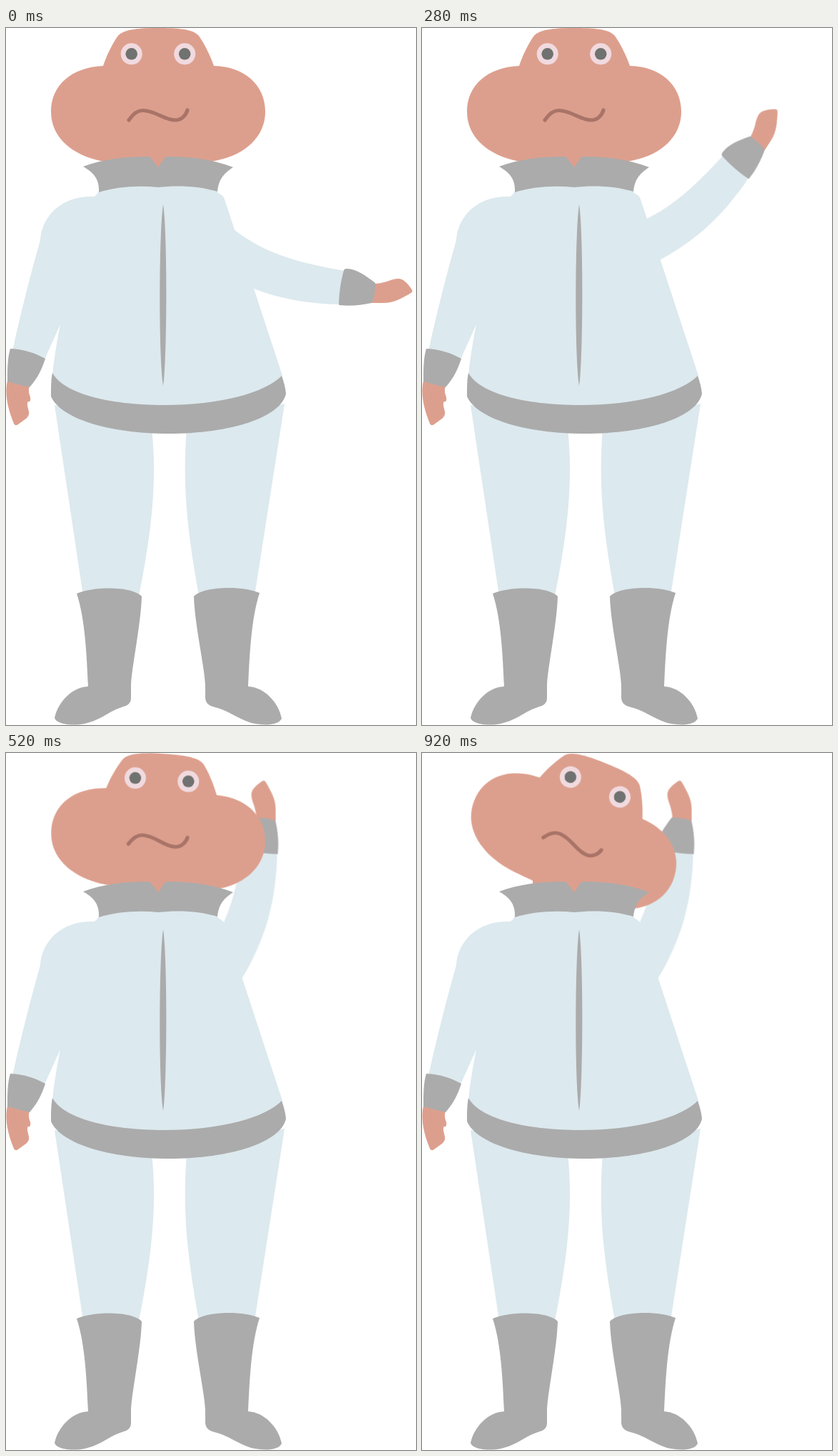
An HTML page for the animation above (0.96 s loop, 574 px wide and 976 px high).

```html
<!DOCTYPE html>
<html lang="en">
<head>
<meta charset="utf-8">
<title>Waving figure</title>
<style>
  html, body { margin: 0; width: 100%; height: 100%; overflow: hidden; background: #fff; }
  svg { display: block; width: 100%; height: 100%; }
  .skin { fill: #dd9f8d; }
  .suit { fill: #dce9ee; }
  .trim { fill: #ababab; }
  .ring { fill: #f0dadf; }
  .pupil { fill: #6f7270; }
  .mouth { fill: none; stroke: #a97468; stroke-width: 5.2; stroke-linecap: round; }

  /* 40 ms steps: the arm rises for 440 ms, then the head tilts */
  .arm { transform-origin: 300px 307.5px; animation: raise 960ms infinite; }
  .head { transform-origin: 198.5px 118px; animation: tilt 960ms infinite; }
  @keyframes raise {
    0% { transform: rotate(0deg); animation-timing-function: steps(11, end); }
    45.8333%, 100% { transform: rotate(-90deg); }
  }
  @keyframes tilt {
    0% { transform: rotate(0deg); animation-timing-function: step-end; }
    45.8333% { transform: rotate(0deg); animation-timing-function: steps(13, end); }
    100% { transform: rotate(23.75deg); }
  }
</style>
</head>
<body>
<svg viewBox="0 0 574 976" preserveAspectRatio="none">
  <!-- legs and boots -->
  <path class="suit" d="M68 528 L108 795 L186 795 C206 695 211 630 204 560 Z"/>
  <path class="suit" d="M390 526 L348 795 L270 795 C253 700 247 640 253 560 Z"/>
  <path class="trim" d="M99 792 C124 781 178 782 190 796 C189 835 175 900 175 922 V938 C175 944 172 948 165 950 C142 957 132 971 105 975 C88 977 70 974 68 966 C73 944 92 923 115 922 C113 880 111 828 99 792 Z"/>
  <path class="trim" d="M263 796 C275 782 330 780 355 791 C343 828 341 880 339 922 C362 923 382 945 386 967 C381 977 360 977 343 973 C322 966 312 956 292 951 C283 949 279 944 279 937 V921 C279 900 264 835 263 796 Z"/>

  <!-- raised arm -->
  <g class="arm">
    <path class="skin" d="M514 358 C532 358 536 352 549 351 C556 351 562 357 568 366 Q570 369 567 371 C553 379 543 385 528 385 L511 385 Z"/>
    <path class="suit" d="M320 283 C362 315 405 328 474 340 L468 387 C400 386 345 370 292 338 L280 330 L288 290 Z"/>
    <path class="trim" d="M473 339 Q474 337 477 337 C490 337 504 347 517 357 C517 368 516 377 512 385 C497 388 482 390 466 388 C466 371 469 354 473 339 Z"/>
  </g>

  <!-- torso and hanging arm -->
  <path class="skin" d="M2 494 C-2 512 2 532 11 554 Q13 558 17 555 L28 547 Q33 543 32 537 C30 530 29 525 31 523 Q35 524 34 517 C32 511 31 508 33 501 Z"/>
  <path class="suit" d="M131 226 Q128 234 123 236 C80 234 50 262 48 297 C33 350 21 398 9 452 L54 464 L76 415 C71 440 67 465 65 486 L120 540 H330 L387 487 L305 237 Q301 233 297 231 L290 215 H140 Z"/>
  <path class="trim" d="M6 449 C26 450 40 455 55 463 C50 479 43 492 33 503 C21 500 11 498 2 495 C2 478 2 462 6 449 Z"/>
  <path class="trim" d="M65 483 C80 511 142 528 222 528 C300 528 362 511 386 487 C389 495 391 504 392 512 C385 545 315 568 228 568 C142 568 76 546 63 516 C63 504 63 492 65 483 Z"/>
  <path class="trim" d="M220 247 C226 285 225.5 465 220 501 C213.5 465 214 285 220 247 Z"/>

  <path class="skin" d="M155 176 H262 V190 L213 204 L155 190 Z"/>
  <g class="head">
    <path class="skin" d="M136 53 C141 38 148 24 156 12 C164 1 190 0 213 0 C238 0 262 1 270 11 C279 24 286 39 291 53 C334 54 363 80 363 117 C363 152 335 177 297 185 C276 190 236 191 213 191 C190 191 150 190 132 186 C95 178 63 155 63 117 C63 80 92 55 136 53 Z"/>
    <circle class="ring" cx="175.7" cy="36.3" r="15"/>
    <circle class="ring" cx="250.2" cy="36.3" r="15"/>
    <circle class="pupil" cx="175.7" cy="36.3" r="8.3"/>
    <circle class="pupil" cx="250.2" cy="36.3" r="8.3"/>
    <path class="mouth" d="M172 129 C178 120 184 115.5 191 115.5 C208 115 222 129 237 129 C246 129 252 122 254 115"/>
  </g>

  <path class="trim" d="M108 194 C135 184 165 180 199 180 Q202 180 203 182 L213 195 L222 182 Q223 180 226 180 C262 180 292 185 318 195 C303 205 298 213 296 229 C270 221 240 220 213 223 C185 220 155 222 130 230 C131 213 124 203 108 194 Z"/>
</svg>
</body>
</html>
```
